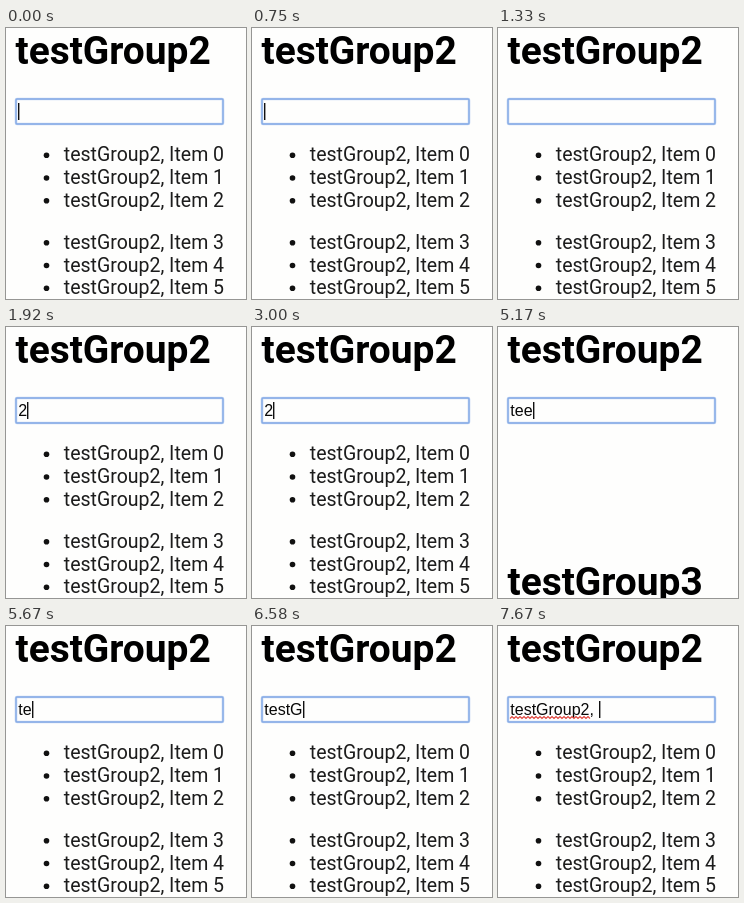
An HTML page that plays this animation: 240x271 px, repeating every 8000 ms.

```html
<!DOCTYPE html>
<html lang="en">
<head>
<meta charset="utf-8">
<title>Filtered list</title>
<style>
  html, body { margin: 0; width: 100%; height: 100%; overflow: hidden; background: #fefefd; }
  svg { display: block; }
  text { white-space: pre; fill: #080808; }
  .title { font: 700 38.9px Roboto, "Open Sans", sans-serif; fill: #000; }
  .item { font: 19.5px Roboto, "Open Sans", sans-serif; fill: #1c1c1c; }
  .typed { font: 16px "Liberation Sans", Arial, sans-serif; }
</style>
</head>
<body>
<svg id="stage" width="240" height="271" viewBox="0 0 240 271">
  <text class="title" x="9.5" y="35.5">testGroup2</text>
  <rect x="10" y="71" width="207" height="25" rx="1" fill="#fefefd" stroke="#c6d8f4" stroke-width="2.6"/>
  <rect x="10" y="71" width="207" height="25" rx="1" fill="none" stroke="#85abe6" stroke-width="1.4"/>
  <text class="typed" id="typed" x="12.3" y="89"></text>
  <path id="squiggle" fill="none" stroke="#e0433c" stroke-width="1.1"/>
  <rect id="caret" y="75" width="1.4" height="17" fill="#111"/>
  <g id="list"></g>
  <text class="title" id="next" x="9.5" y="267.5">testGroup3</text>
</svg>
<script>
const LOOP = 8000;
const $ = id => document.getElementById(id);

// [start ms, text, caret visible]
const steps = [
  [0, '', 1], [250, '', 0], [750, '', 1], [1250, '', 0], [1750, '', 1],
  [1920, '2', 1], [2420, '2', 0], [3000, '2', 1], [3500, '2', 0],
  [4080, '', 1], [4580, '', 0],
  [4830, 't', 1], [5000, 'te', 1], [5170, 'tee', 1], [5670, 'te', 1],
  [6080, 'tes', 1], [6170, 'test', 1], [6580, 'testG', 1],
  [6830, 'testGr', 1], [6920, 'testGro', 1], [7000, 'testGrou', 1],
  [7080, 'testGroup', 1], [7170, 'testGroup2', 1],
  [7420, 'testGroup2,', 1], [7670, 'testGroup2, ', 1]
];
const SQUIGGLE_AT = 7500;

function add(parent, tag, attrs, text = '') {
  const el = document.createElementNS('http://www.w3.org/2000/svg', tag);
  for (const key in attrs) el.setAttribute(key, attrs[key]);
  el.textContent = text;
  parent.append(el);
}

[133.2, 156, 178.7, 220.7, 243.5, 266.2].forEach((y, i) => {
  add($('list'), 'circle', { cx: 40.5, cy: y - 6, r: 2.8, fill: '#111' });
  add($('list'), 'text', { class: 'item', x: 57.8, y }, `testGroup2, Item ${i}`);
});

let wave = 'M12 92.5';
for (let x = 14, up = true; x <= 92; x += 2, up = !up) wave += `L${x} ${up ? 90.5 : 92.5}`;
$('squiggle').setAttribute('d', wave);

const show = (id, on) => $(id).setAttribute('visibility', on ? 'visible' : 'hidden');

function draw(now) {
  const t = now % LOOP;
  const [, text, caretOn] = steps.findLast(step => step[0] <= t);
  const typed = $('typed');
  // A non-breaking space keeps the trailing blank measurable.
  typed.textContent = text.replace(/ $/, '\u00a0');
  const width = text ? typed.getComputedTextLength() : 0;
  $('caret').setAttribute('x', 12 + Math.ceil(width));
  const matches = 'testGroup2, Item'.includes(text.trim());
  show('caret', caretOn);
  show('list', matches);
  show('next', !matches);
  show('squiggle', t >= SQUIGGLE_AT);
}

const start = performance.now();
function tick() {
  draw(performance.now() - start);
  requestAnimationFrame(tick);
}
tick();
</script>
</body>
</html>
```
